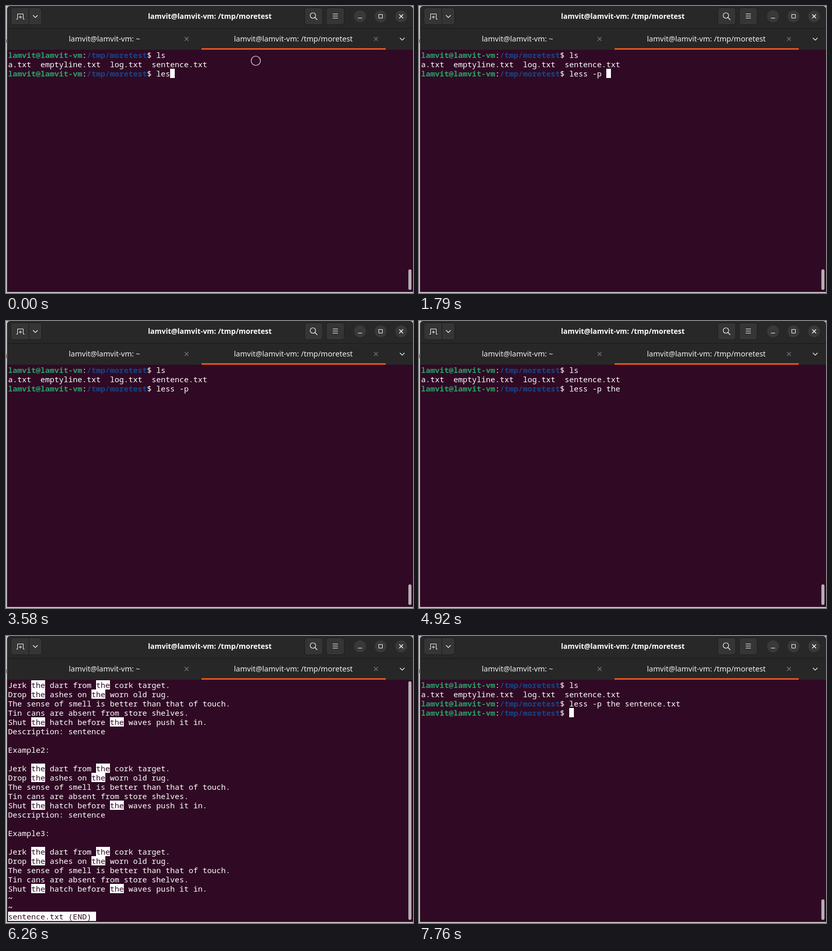
Write an HTML page with a canvas that moves like this. It is 791x558 px and loops after 8 s.

```html
<!DOCTYPE html>
<html lang="en">
<head>
<meta charset="utf-8">
<title>Terminal</title>
<style>
html, body { margin: 0; width: 100%; height: 100%; overflow: hidden; background: #300a24; }
canvas { display: block; }
</style>
</head>
<body>
<canvas id="stage" width="791" height="558"></canvas>
<script>
const ctx = document.getElementById('stage').getContext('2d');
const LOOP = 8000, CW = 9, CH = 18, LEFT = 4, TOP = 86;
const BG = '#300a24', FG = '#ffffff', GREEN = '#26a269', BLUE = '#12488b', ORANGE = '#e95420';
const MONO = '15px "Noto Sans Mono", "DejaVu Sans Mono", monospace';
const SANS = '"Noto Sans", "Open Sans", sans-serif';
const USER = 'lamvit@lamvit-vm', DIR = '/tmp/moretest';
const COMMAND = 'less -p the sentence.txt ';

// [start ms, typed characters, cursor visible]
const TYPING = [
  [0, 3, 1], [150, 4, 1], [450, 5, 1], [1050, 6, 1], [1350, 7, 1], [1790, 8, 1],
  [2390, 8, 0], [2980, 8, 1], [3580, 8, 0], [3720, 9, 1], [3870, 11, 1], [4320, 12, 1],
  [4920, 12, 0], [5220, 13, 1], [5360, 14, 1], [5660, 25, 1]
];
const PAGER_START = 6260, PAGER_END = 7760;

const SENTENCES = [
  'Jerk the dart from the cork target.',
  'Drop the ashes on the worn old rug.',
  'The sense of smell is better than that of touch.',
  'Tin cans are absent from store shelves.',
  'Shut the hatch before the waves push it in.'
];
const heading = n => ['Description: sentence', '', `Example${n}:`, ''];
const PAGE = [...SENTENCES, ...heading(2), ...SENTENCES, ...heading(3), ...SENTENCES];

function rect(x, y, w, h, color) {
  ctx.fillStyle = color;
  ctx.fillRect(x, y, w, h);
}

function label(str, x, y, font, color) {
  ctx.font = font;
  ctx.fillStyle = color;
  ctx.fillText(str, x, y);
}

function line(points, color = FG, width = 1) {
  ctx.beginPath();
  points.forEach(([x, y], i) => i ? ctx.lineTo(x, y) : ctx.moveTo(x, y));
  ctx.strokeStyle = color;
  ctx.lineWidth = width;
  ctx.stroke();
}

function box(x, y, w, h, r, fill, stroke) {
  ctx.beginPath();
  ctx.roundRect(x, y, w, h, r);
  if (fill) { ctx.fillStyle = fill; ctx.fill(); }
  if (stroke) { ctx.strokeStyle = stroke; ctx.lineWidth = 1; ctx.stroke(); }
}

function circle(x, y, r, fill, stroke, width = 1.1) {
  ctx.beginPath();
  ctx.arc(x, y, r, 0, Math.PI * 2);
  if (fill) { ctx.fillStyle = fill; ctx.fill(); }
  if (stroke) { ctx.strokeStyle = stroke; ctx.lineWidth = width; ctx.stroke(); }
}

function cross(x, y, r, color, width) {
  line([[x - r, y - r], [x + r, y + r]], color, width);
  line([[x - r, y + r], [x + r, y - r]], color, width);
}

const chevron = (x, y) => line([[x - 4.5, y - 2], [x, y + 2.5], [x + 4.5, y - 2]], FG, 1.2);

// Terminal cell text
function write(str, col, row, color = FG, bold = false) {
  label(str, LEFT + col * CW, TOP + row * CH + 15, (bold ? 'bold ' : '') + MONO, color);
}

function cells(col, row, n) {
  rect(LEFT + col * CW, TOP + row * CH, n * CW, CH, FG);
}

function reverse(str, col, row) {
  cells(col, row, str.length);
  write(str, col, row, BG);
}

function prompt(row, command, cursor) {
  const dirCol = USER.length + 1, endCol = dirCol + DIR.length;
  write(USER, 0, row, GREEN, true);
  write(':', USER.length, row);
  write(DIR, dirCol, row, BLUE, true);
  write('$ ' + command, endCol, row);
  if (cursor) cells(endCol + 2 + command.length, row, 1);
}

function drawHeader() {
  box(2, 0, 789, 50, [6, 6, 0, 0], '#282828');
  rect(2, 43, 789, 1, '#191919');
  rect(2, 44, 789, 41, '#272727');

  const fill = '#353535', edge = '#1b1b1b';
  box(9.5, 3.5, 60, 33, 5, fill, edge);
  line([[44.5, 4], [44.5, 36]], edge);
  line([[20, 25.5], [22.5, 25.5], [22.5, 15.5], [33.5, 15.5], [33.5, 25.5], [36, 25.5]]);
  line([[25, 21.5], [31, 21.5]]);
  line([[28, 18.5], [28, 24.5]]);
  chevron(57, 20);

  box(580.5, 3.5, 35, 33, 5, fill, edge);
  circle(596.5, 18.5, 5.3, null, FG);
  line([[600.5, 22.5], [605, 27]], FG, 1.2);
  box(622.5, 3.5, 35, 33, 5, fill, edge);
  for (const y of [15.5, 19.5, 23.5]) line([[635, y], [645, y]]);

  for (const x of [688, 728, 768]) circle(x, 20, 11.5, '#393939');
  line([[684, 23.5], [692, 23.5]]);
  line([[724.5, 16.5], [731.5, 16.5], [731.5, 23.5], [724.5, 23.5], [724.5, 16]]);
  cross(768, 20, 3.7, FG, 1.4);

  label(`${USER}: ${DIR}`, 276, 25, `bold 14px ${SANS}`, FG);
}

function drawTabs() {
  const font = `14.55px ${SANS}`;
  label(`${USER}: ~`, 122, 69, font, '#f2f2f2');
  label(`${USER}: ${DIR}`, 443, 69, font, '#f2f2f2');
  cross(351, 64, 3.7, '#757575', 1.3);
  cross(719, 64, 3.7, '#757575', 1.3);
  chevron(770, 64);
  rect(380, 82, 358, 3, ORANGE);
}

function drawWindow() {
  rect(0, 0, 791, 558, '#c8c8c8');
  rect(0, 65, 1, 7, '#5a2a2a');
  rect(2, 84, 789, 472, BG);
  drawHeader();
  drawTabs();
}

function drawShell(t) {
  const done = t >= PAGER_END;
  const [, typed, cursor] = TYPING.findLast(step => step[0] <= t);
  prompt(0, 'ls', false);
  write('a.txt  emptyline.txt  log.txt  sentence.txt', 0, 1);
  prompt(2, COMMAND.slice(0, typed), cursor && !done);
  if (done) prompt(3, '', true);
  if (t < 150) circle(485.5, 106.5, 9, null, FG);
  box(782, 512, 6, 40, 3, '#b5adb2');
}

function drawPager(t) {
  PAGE.forEach((str, row) => {
    write(str, 0, row);
    for (const hit of str.matchAll(/the(?= )/g)) reverse(hit[0], hit.index, row);
  });
  const end = PAGE.length;
  write('~', 0, end, FG, true);
  write('~', 0, end + 1, FG, true);
  reverse('sentence.txt (END)', 0, end + 2);
  if (t < 6860 || t >= 7460) cells(18, end + 2, 1);
  box(782, 88, 6, 464, 3, '#b5adb2');
}

const start = performance.now();
function frame() {
  const t = (performance.now() - start) % LOOP;
  drawWindow();
  if (t >= PAGER_START && t < PAGER_END) drawPager(t);
  else drawShell(t);
  requestAnimationFrame(frame);
}
frame();
</script>
</body>
</html>
```
